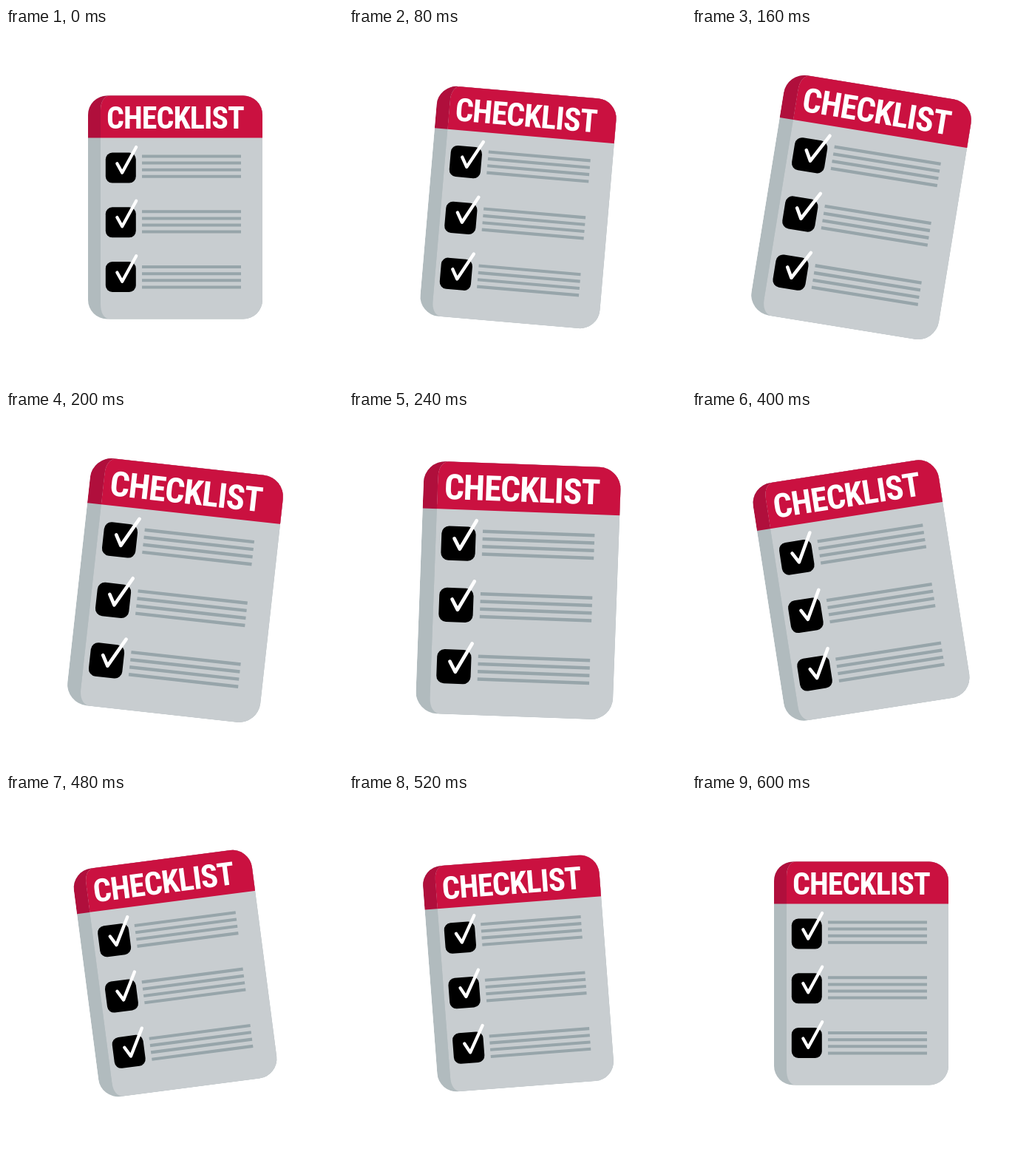
Animation, 456 px wide and 480 px high, one loop 1880 ms. Source, as an HTML page:

```html
<!DOCTYPE html>
<html lang="en">
<head>
<meta charset="utf-8">
<title>Checklist</title>
<style>
  html, body { margin: 0; width: 100%; height: 100%; overflow: hidden; background: #fff; }
  svg { display: block; width: 100%; height: 100%; }
  #title {
    font: 700 42.5px "Roboto Condensed", Roboto, sans-serif;
    font-stretch: 75%;
    letter-spacing: -.022em;
    text-anchor: middle;
    fill: #fff;
  }
  #check { fill: none; stroke: #fff; stroke-width: 4.2; stroke-linecap: round; stroke-linejoin: round; }
  #lines { stroke: #97a5aa; stroke-width: 4; }
</style>
</head>
<body>
<svg viewBox="0 0 456 480">
  <defs>
    <clipPath id="outline"><rect x="111" y="91.5" width="236" height="302" rx="26"/></clipPath>
    <clipPath id="front"><path d="M348 91H141Q128 93 128 112V373Q128 392 141 394H348Z"/></clipPath>
    <rect id="box" x="134.8" y="168.6" width="41" height="41" rx="9"/>
    <path id="check" d="M150.3 183.3L157.2 195.6L176.2 161"/>
    <path id="lines" d="M184 173.5H318M184 182.6H318M184 191.7H318M184 200.8H318"/>
  </defs>
  <g id="card">
    <g clip-path="url(#outline)">
      <path fill="#b1bbbe" d="M111 91H348V394H111Z"/>
      <path fill="#b00f3c" d="M111 91H348V148.5H111Z"/>
      <g clip-path="url(#front)">
        <path fill="#c8cdd0" d="M111 91H348V394H111Z"/>
        <path fill="#ca1140" d="M111 91H348V148.5H111Z"/>
      </g>
    </g>
    <text id="title" x="229">CHECKLIST</text>
    <use href="#box"/>
    <use href="#box" y="73.7"/>
    <use href="#box" y="147.4"/>
    <use href="#check"/>
    <use href="#check" y="72.7"/>
    <use href="#check" y="147.2"/>
    <use href="#lines"/>
    <use href="#lines" y="74.8"/>
    <use href="#lines" y="149.6"/>
  </g>
</svg>
<script>
  const LOOP = 1880, TICK = 40, WIGGLE = 600, GAP = 80;
  // Key values, one every GAP ms
  const angles = [0, 4.9, 9.2, 2.1, -4.15, -8.8, -7.4, -1.3, 0];
  const growth = [0, .033, .088, .13, .13, .077, .03, .003, 0];

  const card = document.getElementById('card');
  const title = document.getElementById('title');

  // Pick the largest type size that fits the header
  const size = 42.5 * Math.min(1, 186 / title.getComputedTextLength());
  title.style.fontSize = size + 'px';
  title.setAttribute('y', 121.5 + size * .355);

  // Catmull-Rom curve through evenly spaced keys
  function curve(keys, t) {
    const i = Math.floor(t / GAP), u = t / GAP - i;
    const [a, b, c, d] = [-1, 0, 1, 2].map(k => keys[i + k] || 0);
    return b + u / 2 * (c - a + u * (2 * a - 5 * b + 4 * c - d + u * (3 * (b - c) + d - a)));
  }

  function draw(now) {
    const t = Math.floor(now % LOOP / TICK) * TICK;
    const moving = t < WIGGLE;
    const angle = moving ? curve(angles, t) : 0;
    const scale = 1 + (moving ? curve(growth, t) : 0);
    card.setAttribute('transform',
      `translate(229 242.5) rotate(${angle}) scale(${scale}) translate(-229 -242.5)`);
    requestAnimationFrame(draw);
  }
  requestAnimationFrame(draw);
</script>
</body>
</html>
```
